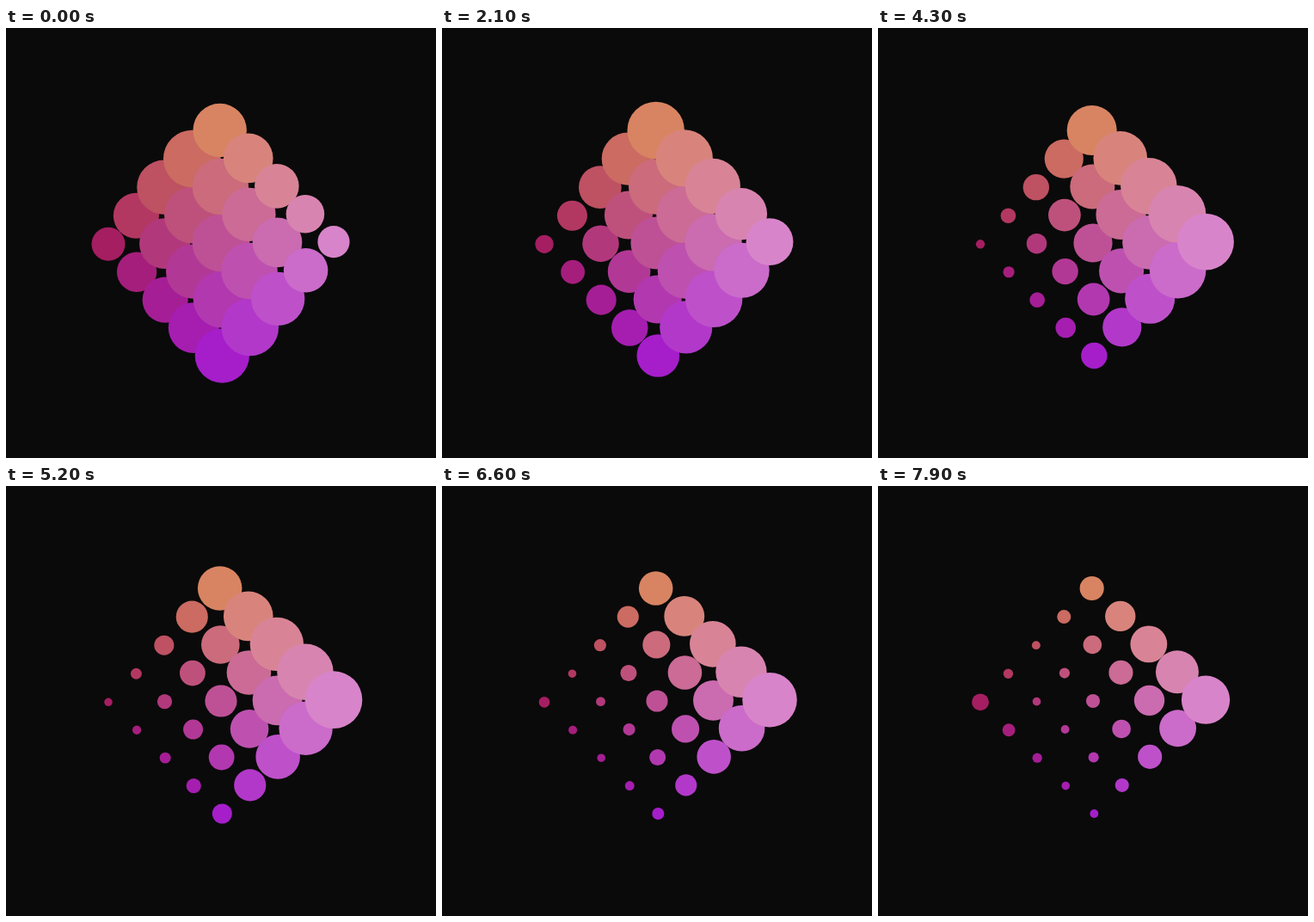
An HTML page with a canvas for the animation above (8000 ms loop, 500 by 500 pixels).

```html
<!DOCTYPE html>
<html lang="en">
<head>
<meta charset="utf-8">
<title>Pulsing dot grid</title>
<style>
  html, body { margin: 0; height: 100%; overflow: hidden; background: #0a0a0a; }
  canvas { display: block; }
</style>
</head>
<body>
<canvas width="500" height="500"></canvas>
<script>
const ctx = document.querySelector('canvas').getContext('2d');
const LOOP = 8000, STEP = 100, PERIOD = 20000;

function dot(i, j, phase) {
  // Grid axes, turned by a little under 45 degrees around the centre
  const u = i - 2, v = j - 2;
  const x = 250 + 32.42 * u + 33.08 * v;
  const y = 250 - 33.08 * u + 32.42 * v;
  const r = 19.04 + 14.28 * Math.cos(phase - Math.PI / 12 * (2 * u + v));
  ctx.fillStyle = `rgb(${165 + 12.7 * i}, ${30 + 25.5 * i}, ${98 + 26 * j})`;
  ctx.beginPath();
  ctx.arc(x, y, r, 0, 2 * Math.PI);
  ctx.fill();
}

function draw(now) {
  const t = Math.floor(now % LOOP / STEP) * STEP;
  const phase = 2 * Math.PI * (t - STEP) / PERIOD;
  ctx.fillStyle = '#0a0a0a';
  ctx.fillRect(0, 0, 500, 500);
  for (let i = 0; i < 5; i++)
    for (let j = 0; j < 5; j++) dot(i, j, phase);
}

const start = performance.now();
function tick() {
  draw(performance.now() - start);
  requestAnimationFrame(tick);
}
tick();
</script>
</body>
</html>
```
